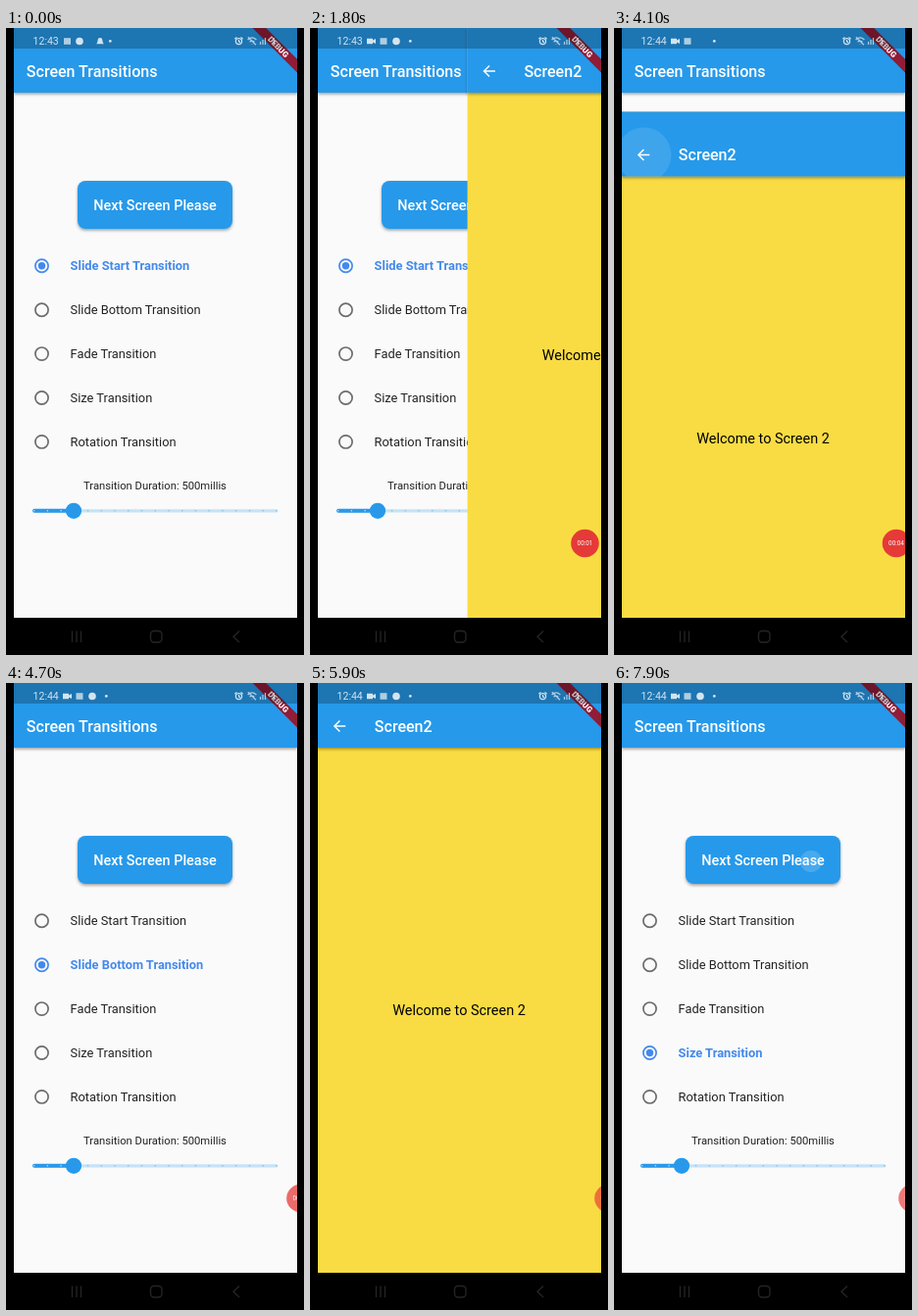
Recreate the animation shown at these times as an HTML page. Size 304 by 640 pixels, loop 8 s.

```html
<!DOCTYPE html>
<html lang="en">
<head>
<meta charset="utf-8">
<title>Screen Transitions</title>
<style>
  html, body { margin: 0; width: 100%; height: 100%; overflow: hidden; background: #000; }
  svg { display: block; width: 304px; height: 640px; font-family: Roboto, sans-serif; }
  .title { font-size: 16.06px; font-weight: 500; fill: #fff; }
  .label { font-size: 12.85px; fill: #222; }
  .label.on { font-weight: 700; fill: #4489ec; }
  .mid { text-anchor: middle; }
  .bar { fill: #2899ea; }
</style>
</head>
<body>
<svg viewBox="0 0 304 640">
  <defs>
    <clipPath id="screen"><rect x="8" width="289" height="602"/></clipPath>
    <clipPath id="button"><rect x="73" y="156" width="158" height="49" rx="8"/></clipPath>
    <clipPath id="appbar"><rect x="8" width="289" height="66"/></clipPath>
    <filter id="shadow" x="-20%" y="-20%" width="140%" height="160%">
      <feDropShadow dx="0" dy="1.6" stdDeviation="1.6" flood-opacity=".36"/>
    </filter>
  </defs>
  <rect width="304" height="640"/>
  <g clip-path="url(#screen)">
    <g id="home">
      <rect x="8" width="289" height="602" fill="#fafafa"/>
      <rect class="bar" x="8" width="289" height="66" filter="url(#shadow)"/>
      <text class="title" x="20.8" y="49.7">Screen Transitions</text>
      <rect class="bar" x="73" y="156" width="158" height="49" rx="8" filter="url(#shadow)"/>
      <g clip-path="url(#button)"><circle id="press" fill="#fff"/></g>
      <text class="title mid" x="152" y="186" style="font-size:14.45px">Next Screen Please</text>
      <g id="options"></g>
      <text class="mid" x="152" y="471.4" font-size="11.24" fill="#222">Transition Duration: 500millis</text>
      <g id="slider"></g>
    </g>
    <g id="next">
      <rect x="8" width="289" height="602" fill="#f9dc43"/>
      <rect class="bar" x="8" width="289" height="66" filter="url(#shadow)"/>
      <g clip-path="url(#appbar)"><circle id="tap" cx="30.5" cy="44" fill="#fff"/></g>
      <path d="M36.3 44H25.2M30.4 38.5L24.9 44L30.4 49.5" fill="none" stroke="#fff" stroke-width="1.5"/>
      <text class="title" x="65.8" y="49.7">Screen2</text>
      <text class="mid" x="152" y="339" font-size="14.45">Welcome to Screen 2</text>
    </g>
    <g transform="translate(297 0) rotate(45)">
      <rect x="-34" y="22.5" width="68" height="9.6" fill="#8f1d36"/>
      <text class="mid" y="30.2" font-size="8.2" font-weight="900" fill="#fff">DEBUG</text>
    </g>
    <rect x="8" width="289" height="21" fill="#000" fill-opacity=".24"/>
    <g fill="#d3e4f0" stroke="#d3e4f0" stroke-width="0">
      <text id="clock" x="27.6" y="17.3" font-size="10.5"></text>
      <g id="icons"></g>
      <g fill="none" stroke-width="1.2">
        <circle cx="237.5" cy="13.6" r="3.1"/>
        <path d="M237.5 11.8V13.8L239 14.6M233.4 11.2L235.4 9.4M241.6 11.2L239.6 9.4"/>
        <path d="M246.6 12Q251 7.8 255.4 12M248.6 14.2Q251 12 253.4 14.2M251 16.4V17M246.8 9.2L255 17.2" stroke-opacity=".8"/>
        <path d="M259.5 17V14M262 17V12M264.5 17V10M273.5 10V17"  stroke-opacity=".8"/>
      </g>
    </g>
    <g id="rec">
      <circle r="14.3" fill="#e53a38"/>
      <text id="timer" class="mid" y="2.3" font-size="6.4" fill="#fff"></text>
    </g>
  </g>
  <g fill="none" stroke="#242424" stroke-width="1.4">
    <path d="M67.5 615.5V627M72 615.5V627M76.5 615.5V627M238 615.5L232 621.2L238 627"/>
    <rect x="147.5" y="615.5" width="11.5" height="11.5" rx="3.5"/>
  </g>
</svg>
<script>
const LOOP = 8000;
const $ = id => document.getElementById(id);
const part = (t, from, to) => Math.min(1, Math.max(0, (t - from) / (to - from)));
const set = (el, attrs) => { for (const k in attrs) el.setAttribute(k, attrs[k]); };
const add = (parent, tag, attrs) => {
  const el = document.createElementNS('http://www.w3.org/2000/svg', tag);
  set(el, attrs);
  return parent.appendChild(el);
};
// Last entry whose first field is not later than t.
const latest = (table, t) => table.filter(row => row[0] <= t).pop();

const visits = [
  { kind: 'start', push: [450, 950], pop: [1537, 2037] },
  { kind: 'bottom', push: [2912, 3412], pop: [4030, 4530] },
  { kind: 'fade', push: [5255, 5755], pop: [6300, 6700] },
];
const presses = [[410, 165], [2860, 170], [5220, 175], [7860, 201]];
const picks = [[0, 0], [2350, 1], [4720, 2], [7360, 3]];
const notices = [
  [0, ['mail', 62.5], ['chat', 75], ['bell', 96], ['dot', 106]],
  [100, ['cam', 62.5], ['mail', 75], ['chat', 88], ['dot', 102]],
  [2500, ['ring', 62.5], ['cam', 75], ['mail', 88], ['dot', 102]],
  [3800, ['cam', 62.5], ['mail', 75], ['dot', 102]],
  [4500, ['cam', 62.5], ['mail', 75], ['chat', 88], ['dot', 102]],
];

const drawIcon = {
  mail: (g, x) => add(g, 'rect', { x: x - 3.5, y: 10.2, width: 7, height: 6.6, 'fill-opacity': .8 }),
  chat: (g, x) => add(g, 'circle', { cx: x, cy: 13.5, r: 3.8 }),
  bell: (g, x) => add(g, 'path', { d: `M${x - 4} 16.2Q${x - 2.4} 15 ${x - 2.4} 12.5A2.4 2.4 0 0 1 ${x + 2.4} 12.5Q${x + 2.4} 15 ${x + 4} 16.2Z` }),
  dot: (g, x) => add(g, 'circle', { cx: x + .3, cy: 13.4, r: 1.4 }),
  cam: (g, x) => add(g, 'path', { d: `M${x - 4.5} 10.8H${x + 1.5}V12.6L${x + 4.5} 11V16L${x + 1.5} 14.4V16.2H${x - 4.5}Z` }),
  ring: (g, x) => {
    add(g, 'circle', { cx: x, cy: 13.5, r: 3.8, fill: 'none', 'stroke-width': 1 });
    add(g, 'rect', { x: x - 1.3, y: 11.6, width: 2.6, height: 3.8 });
  },
};
const noticeSets = notices.map(([from, ...list]) => {
  const g = add($('icons'), 'g', {});
  list.forEach(([name, x]) => drawIcon[name](g, x));
  return [from, g];
});

const options = ['Slide Start', 'Slide Bottom', 'Fade', 'Size', 'Rotation'].map((name, i) => {
  const y = 242.8 + i * 44.9, g = $('options');
  const ink = add(g, 'rect', { x: 8, y: y - 22.5, width: 289, height: 45 });
  const ring = add(g, 'circle', { cx: 36.5, cy: y, r: 6.6, fill: 'none', 'stroke-width': 1.7 });
  const dot = add(g, 'circle', { cx: 36.5, cy: y, fill: '#4489ec' });
  const label = add(g, 'text', { x: 65.6, y: y + 4.6 });
  label.textContent = name + ' Transition';
  return { ink, ring, dot, label };
});

const slider = $('slider');
add(slider, 'rect', { x: 27, y: 491.2, width: 250.5, height: 3.2, rx: 1.6, fill: '#c6e2f6' });
add(slider, 'rect', { x: 27, y: 490.8, width: 42, height: 4, rx: 2, class: 'bar' });
for (let i = 0; i <= 18; i++) {
  add(slider, 'circle', { cx: 28.6 + i * 13.74, cy: 492.8, r: .8, fill: i < 3 ? '#b9ddf6' : '#7fbfea' });
}
add(slider, 'circle', { cx: 69, cy: 492.8, r: 8.1, class: 'bar' });

function drawNext(t) {
  const next = $('next');
  const visit = visits.find(v => t >= v.push[0] && t < v.pop[1]);
  next.style.display = visit ? '' : 'none';
  if (!visit) return;
  const shown = part(t, ...visit.push) - part(t, ...visit.pop);
  const away = 1 - shown;
  const dx = visit.kind === 'start' ? away * 289 : 0;
  const dy = visit.kind === 'bottom' ? away * 602 : 0;
  set(next, { transform: `translate(${dx} ${dy})`, opacity: visit.kind === 'fade' ? shown : 1 });
  const age = t - visit.pop[0];
  set($('tap'), {
    r: 28 * part(age, -20, 60),
    'fill-opacity': .11 * (1 - part(age, 90, 220)),
  });
}

function drawPress(t) {
  const press = latest(presses, t);
  const age = press ? t - press[0] : LOOP;
  set($('press'), {
    cx: press ? press[1] : 0, cy: 182,
    r: 2 + 130 * part(age, 20, 320),
    'fill-opacity': .16 * (1 - part(age, 250, 450)),
  });
}

function drawOptions(t) {
  const [since, chosen] = latest(picks, t);
  const age = since ? t - since : LOOP;
  options.forEach(({ ink, ring, dot, label }, i) => {
    const on = i === chosen;
    set(ring, { stroke: on ? '#4489ec' : '#6c6c6c' });
    set(dot, { r: on ? 3.7 * part(age, 0, 180) : 0 });
    set(label, { class: on ? 'label on' : 'label' });
    set(ink, { 'fill-opacity': on ? .07 * (1 - part(age, 80, 330)) : 0 });
  });
}

function drawStatus(t) {
  $('clock').textContent = t < 2500 ? '12:43' : '12:44';
  const current = latest(noticeSets, t);
  noticeSets.forEach(row => { row[1].style.display = row === current ? '' : 'none'; });
  const docked = part(t, 4550, 4750);
  const x = 280.5 + 7.5 * part(t, 2300, 2450) + 16.5 * docked;
  const rec = $('rec');
  rec.style.display = t < 100 ? 'none' : '';
  set(rec, { transform: `translate(${x} 526)`, opacity: 1 - .35 * docked });
  $('timer').textContent = '00:0' + Math.floor(t / 1000);
}

function frame() {
  const t = performance.now() % LOOP;
  drawNext(t);
  drawPress(t);
  drawOptions(t);
  drawStatus(t);
  requestAnimationFrame(frame);
}
frame();
</script>
</body>
</html>
```
